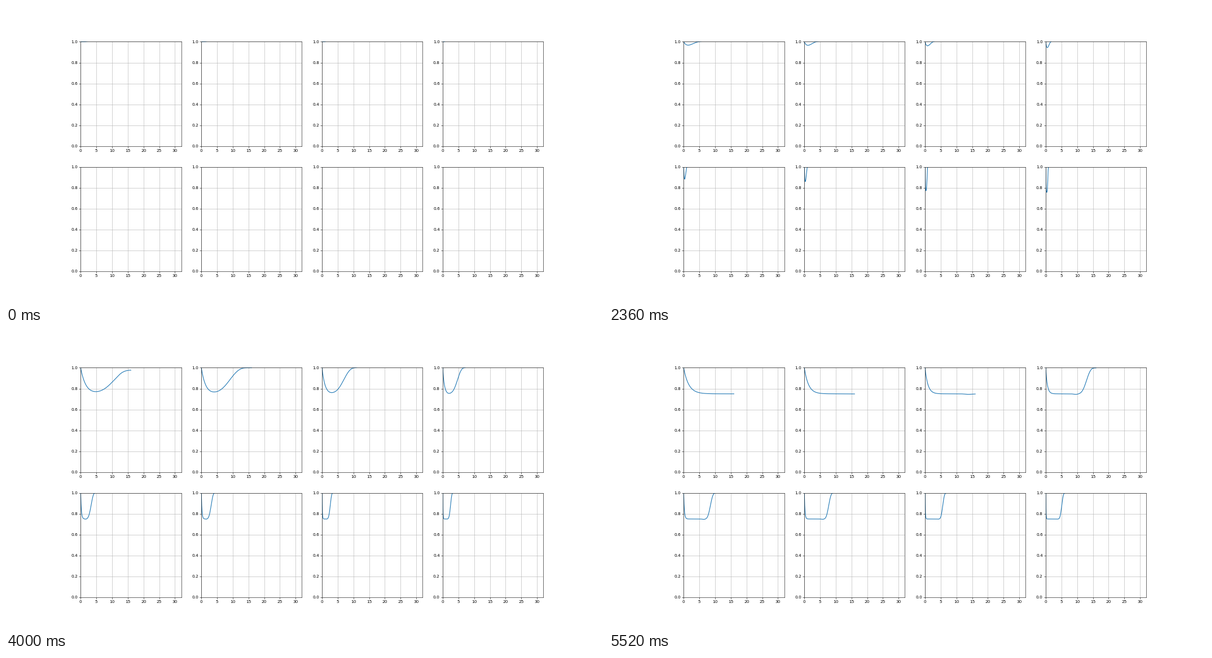
These frames come from a looping animation (1058x529 px, 5560 ms). A matplotlib script:

```python
import numpy as np
import matplotlib.pyplot as plt
from matplotlib.animation import FuncAnimation

FRAMES, STEP = 139, 40
LENGTH, DROP = 16.0, 0.25
LAYERS = (1.6, 1.3, 0.9, 0.5, 0.23, 0.19, 0.095, 0.075)
x = np.linspace(0, LENGTH, 129)


def smoothstep(s):
    s = np.clip(s, 0, 1)
    return s * s * (3 - 2 * s)


def front_at(t, layer):
    """Front position: slow start, then a constant speed."""
    tau = t - 3.15 + 0.17 * (np.log(layer) + 0.75) ** 2
    return 4.85 * layer ** 0.6 * (tau + np.sqrt(tau ** 2 + 0.95 + 0.28 * layer))


def profile(t, layer):
    late = smoothstep((t - 2.5) / 2.5)
    narrow, wide = 4.3 * layer ** 1.2, 0.9 + 4.8 * layer
    width = narrow + (wide - narrow) * (0.83 * late if layer > 0.7 else late)
    power = 1.7 + 1.4 * late

    # flatten the front against the closed right end
    zone = 0.45 * width
    xe = x - np.clip(x - LENGTH + zone, 0, None) ** 2 / (2 * zone)

    d = (front_at(t, layer) - xe) / width
    fill = 1 - np.exp(-np.clip(d, 0, None) ** power)
    fill += late * min(0.02, 0.06 * layer) * np.exp(-((d - 1.9) / 0.3) ** 2)
    start = 1 - np.exp(-0.35 * t ** 3 / layer)
    u = 1 - DROP * start * fill * (1 - np.exp(-x / layer))

    # slight overshoot ahead of the front
    return u + 0.01 * (1 - np.exp(6 * np.clip(d, None, 0)))


fig, axes = plt.subplots(2, 4, figsize=(20, 10), dpi=52.9)
for ax in axes.flat:
    ax.set(xlim=(0, 32), ylim=(0, 1),
           xticks=range(0, 31, 5), yticks=np.linspace(0, 1, 6))
    ax.grid(True)
    ax.spines[:].set_visible(False)

# grids and labels never change, so they are rendered only once
fig.canvas.draw()
backdrop = np.array(fig.canvas.buffer_rgba())
fig.figimage(backdrop, origin="upper", zorder=-5)

lines = []
for ax in axes.flat:
    for part in (ax.xaxis, ax.yaxis, ax.patch):
        part.set_visible(False)
    ax.spines[:].set_visible(True)
    lines += ax.plot([], [], color="C0", lw=1.5)


def update(i):
    t = i * STEP / 1000
    for line, layer in zip(lines, LAYERS):
        line.set_data(x, profile(t, layer))
    return lines


anim = FuncAnimation(fig, update, frames=FRAMES, interval=STEP,
                     init_func=lambda: update(0), repeat=True, repeat_delay=0)
plt.show()
```
